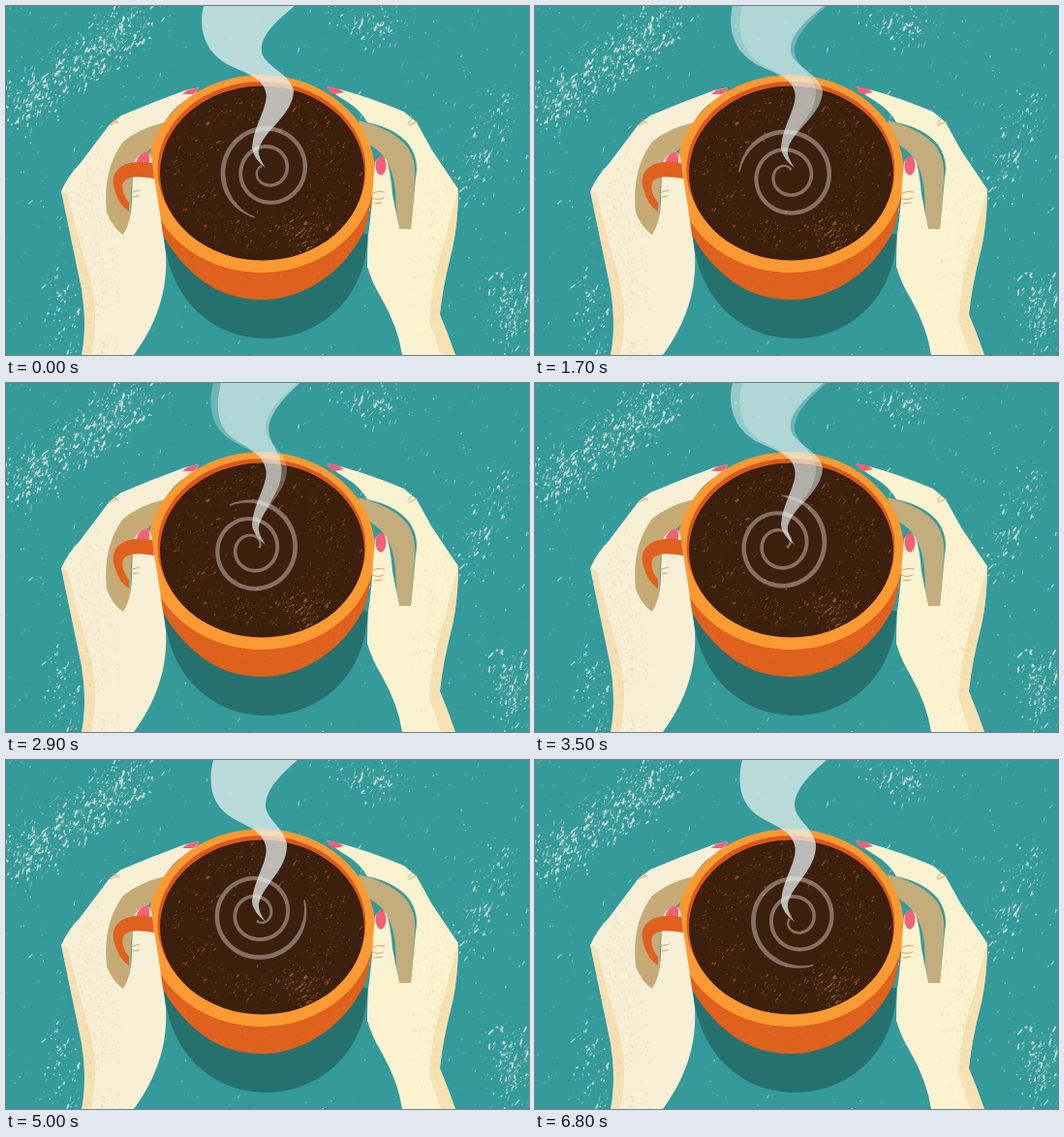
An HTML page that plays this animation: 540 px wide and 360 px high, repeating every 6950 ms.

```html
<!DOCTYPE html>
<html lang="en">
<head>
<meta charset="utf-8">
<title>Warm cup</title>
<style>
  html, body { margin: 0; width: 100%; height: 100%; overflow: hidden; background: #359a9a; }
  svg { display: block; width: 540px; height: 360px; }
  .specks { fill: none; stroke-linecap: round; }
  .nail { fill: #f2607a; }
  .left { fill: #f7efd6; }
  .right { fill: #fbf2cf; }
  .shade { fill: #f5dcaa; opacity: .75; }
  .crease { fill: none; stroke: #e0a066; stroke-linecap: round; }
  #steam { fill: #ebf5f1; }
</style>
</head>
<body>
<svg viewBox="0 0 540 360">
  <defs>
    <clipPath id="inCoffee"><use href="#coffee"/></clipPath>
    <clipPath id="inBody"><use href="#body"/></clipPath>
    <clipPath id="inLeft"><use href="#leftPalm"/></clipPath>
    <clipPath id="inRight"><use href="#rightPalm"/></clipPath>
  </defs>

  <rect width="540" height="360" fill="#359a9a"/>
  <g id="splatter" class="specks" stroke="#e6eee2"></g>
  <path d="M163 225C162 295 208 343 268 343C325 343 373 300 373 235Z" fill="#25716d"/>

  <!-- hands behind the cup -->
  <path d="M170 117Q130 127 114 145Q98 185 104 215Q110 232 120 237L128 234L130 175Q140 149 165 137Z" fill="#c6ab76"/>
  <path d="M364 118Q400 127 415 146Q424 160 422 180L418 230L404 230L402 190Q398 150 368 140Z" fill="#c3ad7c"/>
  <path id="leftPalm" class="left" d="M78 360Q84 331 78 292L57 191Q64 175 76 163L107 122L119 113Q152 99 185 87L199 84Q198 91 186 97Q171 106 164 120Q138 126 121 140C106 160 101 185 104 213Q111 230 121 236Q130 224 130 205L160 225L165 255C167 290 158 325 132 360Z"/>
  <path id="rightPalm" class="right" d="M409 360Q405 332 388 302Q377 284 373 268L374 237L381 201L400 205L406 230L418 230L423 177Q427 159 416 143Q402 126 373 120Q366 107 351 98Q339 91 331 83L345 86Q378 95 411 109L424 120L440 149L467 189Q467 222 461 250Q451 288 448 318L456 338L464 360Z"/>
  <g clip-path="url(#inLeft)">
    <path class="shade" d="M57 191L78 292Q84 331 78 360L88 360Q96 325 88 285Q72 230 64 194Z"/>
    <g id="grainLeft" class="specks" stroke="#ebc188"></g>
  </g>
  <g clip-path="url(#inRight)">
    <path class="shade" d="M467 189Q467 222 461 250Q451 288 448 318L464 360L449 360L437 324Q440 280 453 243Q460 211 467 189Z"/>
    <g id="grainRight" class="specks" stroke="#ebc188"></g>
  </g>
  <path class="nail" d="M182 91L187 87L199 84Q198 89 193 91ZM331 83L343 85L349 89L339 91Q333 89 331 83Z"/>
  <path class="crease" d="M107 123L115 119M111 117L116 121M425 119L416 123M420 116L415 121"/>

  <!-- cup -->
  <path id="body" d="M150 195Q157 232 172 252C196 284 225 303 264 303C305 303 350 276 371 229L380 190Z" fill="#de611d"/>
  <g clip-path="url(#inBody)"><g id="grainBody" class="specks" stroke="#f0863a"></g></g>
  <ellipse cx="263.500" cy="173" rx="117.500" ry="102" fill="#fb9a33"/>
  <ellipse cx="264" cy="169" rx="107.500" ry="91" fill="#d9581d"/>
  <ellipse id="coffee" cx="264.500" cy="172.500" rx="105.500" ry="90" fill="#3c1f0d"/>
  <g clip-path="url(#inCoffee)"><g id="flecks" class="specks" stroke="#a86b26"></g></g>

  <!-- thumbs and handle -->
  <path class="left" d="M121 236Q130 222 130 199L131 164Q136 152 145 150Q151 153 151 166Q155 187 158 208L164 249L145 275Z"/>
  <path class="nail" d="M134 164Q136 151 146 150Q150 156 147 164Z"/>
  <path d="M151 162C122 157 106 169 112 189Q116 205 127 212L127 203Q118 192 121 182Q126 173 153 178Z" fill="#e0601f"/>
  <path class="right" d="M373 270L374 237Q378 207 379 184L381 161Q387 151 393 159Q397 170 399 194L406 230L396 270Z"/>
  <ellipse class="nail" cx="387" cy="164.500" rx="5.500" ry="10"/>
  <path class="crease" d="M379 193Q385 190 391 192M378 198Q384 201 390 198M380 204L388 203M131 192L138 190M131 197L137 196"/>

  <path id="spiral" fill="#e9e2db" opacity=".42"/>
  <g id="steam"></g>
</svg>
<script>
  const $ = id => document.getElementById(id);

  function addPath(parent, attrs) {
    const path = document.createElementNS('http://www.w3.org/2000/svg', 'path');
    for (const name in attrs) path.setAttribute(name, attrs[name]);
    return $(parent).appendChild(path);
  }

  let seed = 11;
  const rand = () => (seed = seed * 16807 % 2147483647) / 2147483647;
  const even = () => rand() * 2 - 1;
  const bell = () => (even() + even() + even()) / 2;

  // Mostly tiny strokes around a centre, leaning along tilt.
  function scatter(id, x, y, rx, ry, count, { tilt = -1.1, size = 1, opacity = .8, spread = bell } = {}) {
    for (let width = .6; width < 2; width += .6) {
      let d = '';
      for (let i = 0; i < count / width / 3; i++) {
        const len = rand() ** 4 * 6 * size + .1, a = tilt + even() * .4;
        d += `M${x + spread() * rx} ${y + spread() * ry}l${Math.cos(a) * len} ${Math.sin(a) * len}`;
      }
      addPath(id, { d, 'stroke-width': width * size, opacity });
    }
  }

  // Paint splatter: loose dust, a diagonal drift at upper left, patches at right.
  scatter('splatter', 270, 180, 270, 180, 500, { size: .8, opacity: .6, spread: even });
  for (let i = 0; i < 6; i++) scatter('splatter', 10 + i * 24, 105 - i * 17, 30, 28, 110);
  for (let i = 0; i < 4; i++) scatter('splatter', 510 - i * 12, 110 + i * 25, 24, 26, 30);
  scatter('splatter', 372, 15, 40, 28, 110);
  scatter('splatter', 523, 318, 28, 44, 200);
  scatter('splatter', 62, 318, 24, 50, 90);

  // Golden flecks circling the bowl, thickest at lower right.
  for (let a = 0; a < 6.28; a += .4)
    scatter('flecks', 264 + Math.cos(a) * 75, 172 + Math.sin(a) * 65, 26, 22, 36, { tilt: -.75, size: .6 });
  scatter('flecks', 310, 236, 28, 20, 120, { tilt: -.75, size: .8 });

  const fine = { tilt: 1.3, size: .5, opacity: .6 };
  scatter('grainBody', 264, 270, 110, 40, 500, { ...fine, spread: even });
  scatter('grainLeft', 88, 260, 28, 110, 600, fine);
  scatter('grainRight', 448, 260, 26, 110, 400, fine);

  const PIVOT = '262 167', CX = 265.5, CY = 167, TAIL = 100, TURNS = 2.4;

  // A swaying spiral drawn as a ribbon that tapers at the tail.
  function spiralPath() {
    const outer = [], inner = [];
    for (let u = 0; u <= TURNS; u += 1 / 60) {
      const r = 51 - 18.5 * u + 6 * Math.cos(2 * Math.PI * (u - .77));
      const half = Math.min(.8 + u * 12, 2.5 - u * .4);
      const a = TAIL * Math.PI / 180 + u * 2 * Math.PI;
      const at = d => `${CX + Math.cos(a) * d} ${CY + Math.sin(a) * d}`;
      outer.push(at(r + half));
      inner.unshift(at(Math.max(0, r - half)));
    }
    return `M${outer.concat(inner).join('L')}Z`;
  }
  $('spiral').setAttribute('d', spiralPath());

  // The wisp grows slimmer as k rises.
  const wispPath = k => `M${204 + k} 0
    C${198 + k} 25 ${206 + k * .6} 47 ${228 + k * .6} 60
    C${246 + k * .4} 69 264 73 268 88 C272 103 256 122 254 146
    Q255 157 268 167 Q260 156 261 148
    C266 128 ${297 - k * .6} 112 ${297 - k * .7} 87
    C${293 - k * .6} 69 ${266 + k * .3} 62 ${264 + k * .4} 47
    C${262 + k * .6} 30 ${281 + k * .4} 14 ${298 + k * .3} 0Z`;
  const wisps = [0, 10, 18].map(k => addPath('steam', { d: wispPath(k) }));

  const LOOP = 6950, FIRST = 200, STEP = 150;

  function draw(time) {
    const t = time % LOOP;
    const n = t < FIRST ? 0 : 1 + Math.floor((t - FIRST) / STEP);
    $('spiral').setAttribute('transform', `rotate(${n * 7.2} ${PIVOT})`);
    // The wisps dissolve back and forth over twelve steps.
    const p = n % 12, place = Math.min(p, 12 - p) / 3;
    wisps.forEach((wisp, i) => {
      const share = Math.max(0, 1 - Math.abs(place - i));
      wisp.setAttribute('opacity', .73 * share ** .8);
    });
  }

  const start = performance.now();
  function tick() {
    draw(performance.now() - start);
    requestAnimationFrame(tick);
  }
  tick();
</script>
</body>
</html>
```
